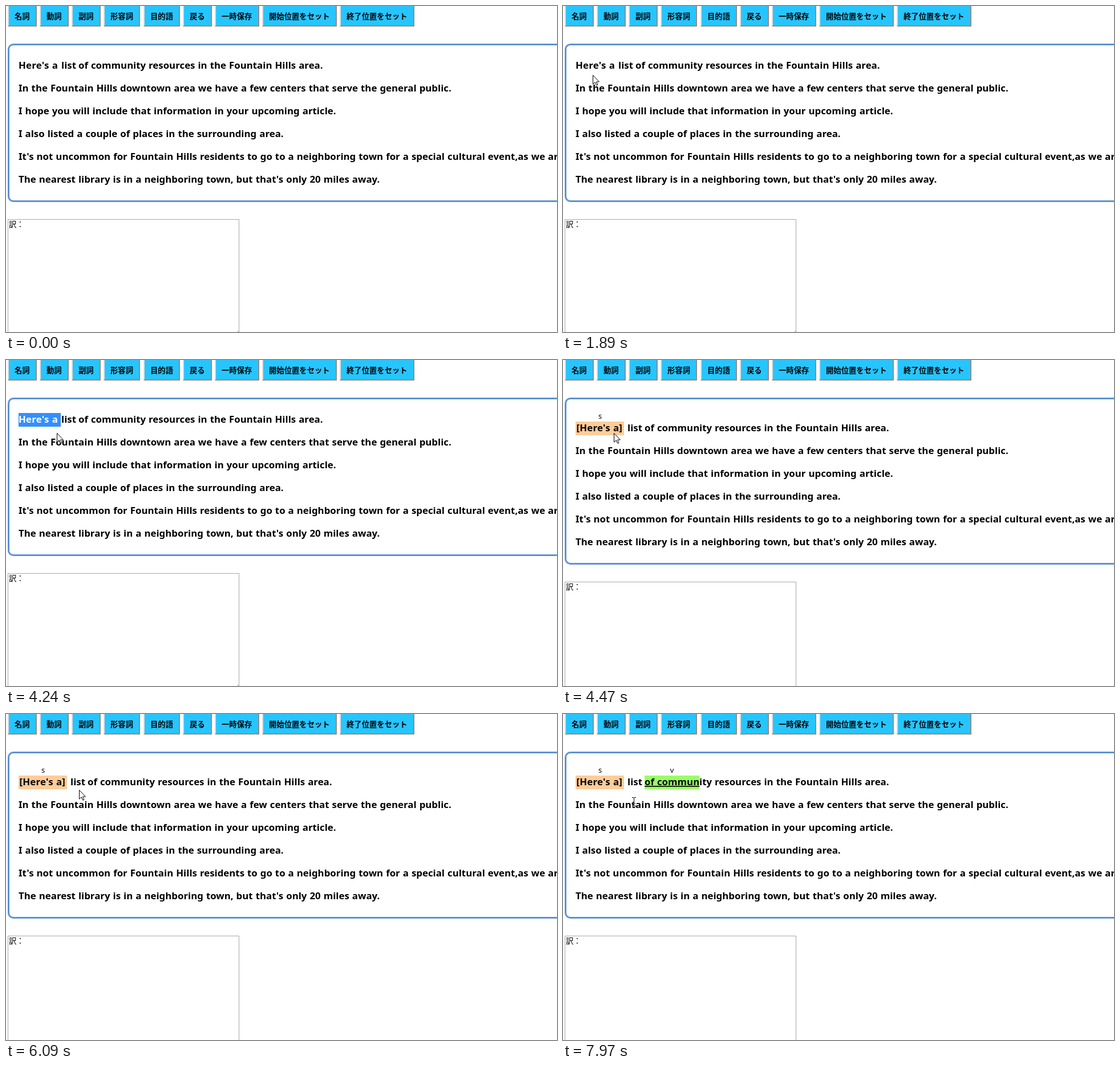
Recreate the animation shown at these times as an HTML page. Size 966x572 px, loop 8 s.

```html
<!DOCTYPE html>
<html lang="ja">
<head>
<meta charset="utf-8">
<title>Sentence marker</title>
<style>
  html, body { margin: 0; width: 100%; height: 100%; overflow: hidden; background: #fff; }
  svg { display: block; width: 966px; height: 572px; }
  text { white-space: pre; }
  .line { font: 700 16.85px "Noto Sans", "Open Sans", sans-serif; word-spacing: .62px; }
  .head { letter-spacing: .2px; }
  .btn { font: 700 13.333px "Noto Sans CJK JP", "Noto Sans CJK", sans-serif; }
  .note { font: 400 13.333px "Noto Sans CJK JP", "Noto Sans CJK", sans-serif; }
  .ruby { font: 400 13px "Noto Sans", sans-serif; text-anchor: middle; }
  #beam { mix-blend-mode: difference; }
</style>
</head>
<body>
<svg id="stage" viewBox="0 0 966 572" xmlns="http://www.w3.org/2000/svg">
  <rect width="966" height="572" fill="#fff"/>
  <g id="buttons"></g>
  <rect id="panel" x="4.5" y="67.5" width="1000" height="275" rx="8.5" fill="none" stroke="#5d93d2" stroke-width="3"/>
  <g id="marks">
    <rect id="mark1" fill="#fc9" stroke="#000"/>
    <rect id="mark2" fill="#9f6" stroke="#000"/>
    <rect id="sel" fill="#338fff"/>
  </g>
  <g id="first" class="line">
    <text id="head" class="head"></text>
    <text id="list">list </text>
    <text id="pick"></text>
    <text id="tail">ity resources in the Fountain Hills area.</text>
  </g>
  <text id="s" class="ruby" y="103">s</text>
  <text id="v" class="ruby" y="103">v</text>
  <g id="lower">
    <g id="lines" class="line"></g>
    <rect x="3.5" y="374.5" width="405" height="210" fill="#fff" stroke="#a9a9a9"/>
    <text class="note" x="5" y="388">訳：</text>
    <path d="M404.5 573.5L408 570" stroke="#888" fill="none"/>
  </g>
  <path id="arrow" d="M.5 .5V16.2L4.2 12.8 6.7 18.3 8.9 17.3 6.5 12H11.4Z" fill="#fff" stroke="#000"/>
  <path id="beam" d="M0 .5H3M4 .5H7M3.5 1V15M0 15.5H3M4 15.5H7" stroke="#fff" fill="none"/>
</svg>
<script>
const LOOP = 8000;
const MARK_S = 4470, MARK_V = 7420, HOVER_DELAY = 70;
const el = id => document.getElementById(id);
const set = (node, attrs) => { for (const k in attrs) node.setAttribute(k, attrs[k]); };
const show = (node, on) => set(node, { visibility: on ? "visible" : "hidden" });

// The top edge of the buttons lies above the stage
const buttons = [
  [3, 51, "名詞"], [59, 51, "動詞"], [115, 51, "副詞"], [171, 64, "形容詞"], [241, 64, "目的語"],
  [310, 51, "戻る"], [366, 78, "一時保存"], [449, 131, "開始位置をセット"], [585, 131, "終了位置をセット"]
];
el("buttons").innerHTML = buttons.map(([x, w, label]) => `
  <rect x="${x}" y="-2" width="${w}" height="38" fill="#ddd"/>
  <path d="M${x} 36l2 -2L${x + w - 2} 0l2 -2V36Z" fill="#8c8c8c"/>
  <rect x="${x + 2}" y="0" width="${w - 4}" height="34" fill="#27c5ff"/>
  <text class="btn" x="${x + 12}" y="23">${label}</text>`).join("");

const lines = [
  "In the Fountain Hills downtown area we have a few centers that serve the general public.",
  "I hope you will include that information in your upcoming article.",
  "I also listed a couple of places in the surrounding area.",
  "It's not uncommon for Fountain Hills residents to go to a neighboring town for a special cultural event,as we are",
  "The nearest library is in a neighboring town, but that's only 20 miles away."
];
el("lines").innerHTML = lines.map((s, i) => `<text x="22" y="${150 + i * 40}">${s}</text>`).join("");
const lineEnds = [560, 780, 575, 489, 966, 658];

// Pointer moves: start, end, steps, then waypoints [progress, x, y]
const moves = [
  [500, 1290, 11, [1 / 11, 747, 529], [.5, 385, 262], [1, 189.5, 141]],
  [1350, 2120, 11, [8 / 11, 52, 121], [1, 25.5, 113]],
  [2210, 2270, 2, [1, 20, 110]],
  [2670, 3370, 10, [1, 96.5, 107]],
  [4070, 4240, 3, [1, 89, 128]],
  [4620, 5240, 9, [1 / 9, 89, 130], [4 / 9, 98, 162], [8 / 9, 78, 126], [1, 77, 125]],
  [5470, 5540, 2, [.5, 82, 136], [1, 86, 143]],
  [5710, 5780, 2, [.5, 87, 136], [1, 88, 126]],
  [5950, 6320, 6, [1 / 6, 103, 130], [.5, 128, 133], [1, 146.5, 123]],
  [6550, 6870, 5, [1, 239.5, 123]],
  [7100, 7100, 1, [1, 238.5, 123]],
  [7420, 7970, 8, [1 / 8, 238.5, 123], [2 / 8, 236, 123], [6 / 8, 150, 167], [1, 124.5, 154]]
];

function pointer(t) {
  let pos = [747, 529];
  for (const [t0, t1, n, ...points] of moves) {
    if (t < t0) break;
    const gap = n > 1 ? (t1 - t0) / (n - 1) : 1;
    const u = Math.min(n, Math.floor((t - t0) / gap + .15) + 1) / n;
    let from = [0, ...pos];
    for (const p of points) {
      const k = Math.min(1, (u - from[0]) / (p[0] - from[0]));
      pos = [1, 2].map(i => from[i] + (p[i] - from[i]) * k);
      if (u <= p[0] + 1e-6) break;
      from = p;
    }
  }
  return pos;
}

function overText(x, y, shift) {
  if (x < 409 && y > 374 + shift) return true;
  const dy = y - 93 - shift, row = Math.floor(dy / 40);
  return row >= 0 && row < 6 && dy - row * 40 < 24 && x >= 22 && x < lineEnds[row];
}

const inside = (x, y, x0, x1) => x >= x0 && x < x1 && y >= 108 && y < 132;

function write(node, text, x, y, picked) {
  set(node, { x, y });
  const key = picked + text;
  if (node.dataset.key === key) return;
  node.dataset.key = key;
  node.innerHTML = `<tspan fill="#fff">${text.slice(0, picked)}</tspan>${text.slice(picked)}`;
}

// A hovered mark grows by a 3px border on every side
function mark(node, x, w, hot, on) {
  show(node, on);
  const b = hot ? 1.5 : 0;
  set(node, { x: x + b, y: 108 - b, width: w + 2 * b, height: 24 + 2 * b, "stroke-width": b * 2 });
}

function draw(t) {
  const marked = t >= MARK_S, verb = t >= MARK_V;
  const shift = marked ? 15 : 0, base = 110 + shift;
  const [x, y] = pointer(t);
  const hot1 = t >= MARK_S + 150 && inside(x, y, 22, 107);
  const hot2 = t >= MARK_V + HOVER_DELAY && inside(x, y, 143, 239);

  const count = (x0, w) => Math.max(0, Math.min(9, Math.round((x - x0) / w * 9)));
  const n1 = t >= 2670 && !marked ? (t >= 3370 ? 9 : count(22, 75)) : 0;
  const n2 = t >= 6550 && !verb ? count(143, 96) : 0;

  const start = marked ? (hot1 ? 119 : 113) : 97;
  const pickX = start + 30;
  write(el("head"), marked ? "[Here's a]" : "Here's a ", marked ? (hot1 ? 26.5 : 23.5) : 22, base, n1);
  set(el("list"), { x: start, y: base });
  write(el("pick"), "of commun", pickX + (hot2 ? 3 : 0), base, n2);
  set(el("pick"), { "text-decoration": verb ? "underline" : "none" });
  set(el("tail"), { x: pickX + 96 + (hot2 ? 6 : 0), y: base });

  mark(el("mark1"), 22, 85, hot1, marked);
  mark(el("mark2"), pickX, 96, hot2, verb);
  show(el("s"), marked);
  show(el("v"), verb);
  set(el("s"), { x: hot1 ? 68 : 65 });
  set(el("v"), { x: pickX + 48 + (hot2 ? 3 : 0) });

  const n = n1 || n2;
  show(el("sel"), n > 0);
  if (n) {
    const node = el(n1 ? "head" : "pick");
    set(el("sel"), {
      x: n1 ? 22 : pickX, y: 93, height: n1 ? 24 : 39,
      width: Math.round(node.getSubStringLength(0, n))
    });
  }

  set(el("panel"), { height: 275 + shift });
  set(el("lower"), { transform: `translate(0 ${shift})` });

  // The pointer keeps its shape until it moves again after the relayout
  const onText = overText(x, y, t >= MARK_S + 150 ? 15 : 0);
  const seen = t >= 500;
  show(el("arrow"), seen && !onText);
  show(el("beam"), seen && onText);
  set(el("arrow"), { transform: `translate(${Math.round(x)} ${Math.round(y)})` });
  set(el("beam"), { transform: `translate(${Math.round(x - 3.5)} ${Math.round(y - 8)})` });
}

function frame() {
  draw(performance.now() % LOOP);
  requestAnimationFrame(frame);
}
frame();
</script>
</body>
</html>
```
